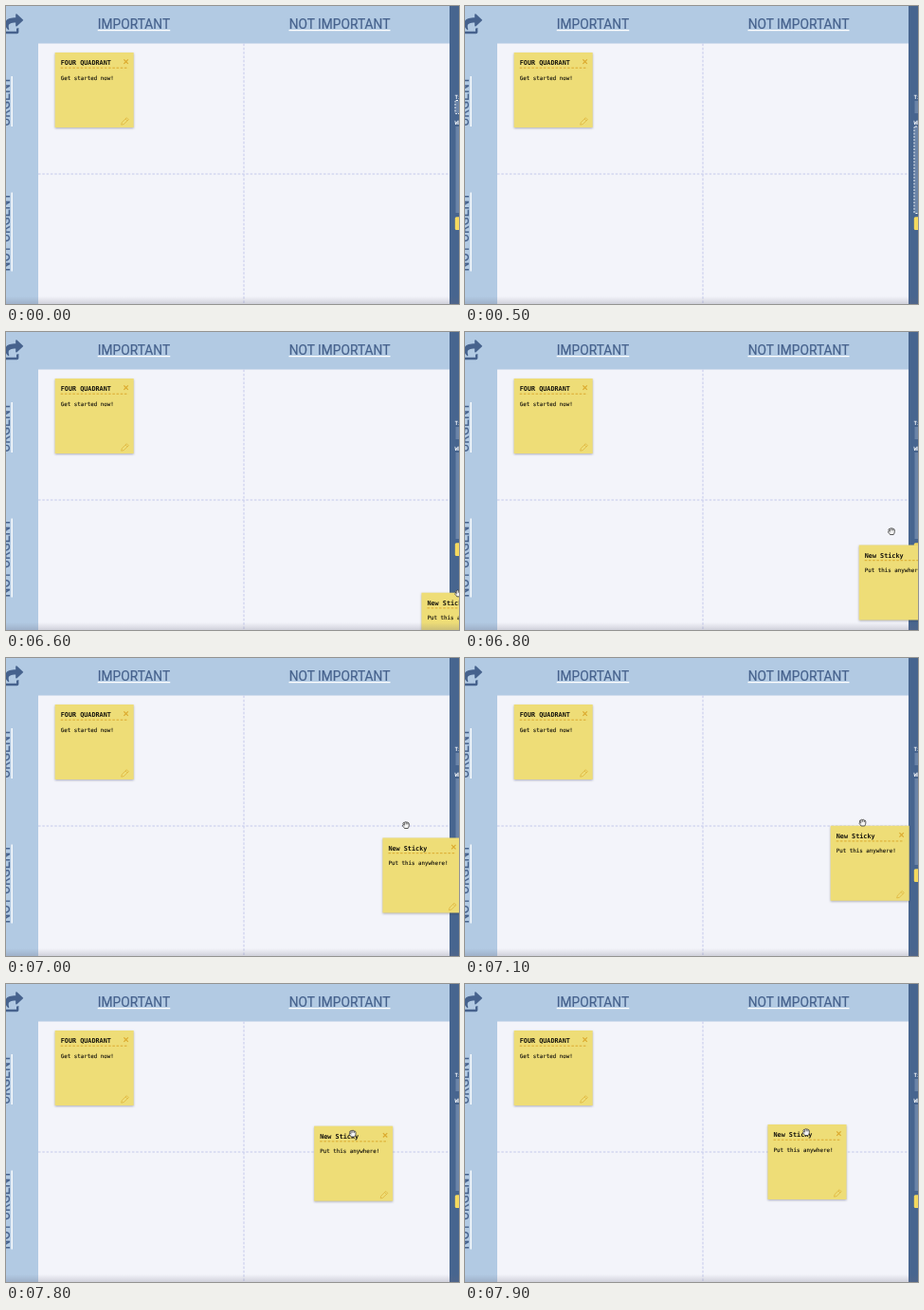
Recreate the animation shown at these times as an HTML page. Size 478x314 px, loop 8 s.

```html
<!DOCTYPE html>
<html lang="en">
<head>
<meta charset="utf-8">
<title>Quadrant board</title>
<style>
  html, body { margin: 0; width: 100%; height: 100%; overflow: hidden; background: #b2cae3; }
  svg { display: block; width: 478px; height: 314px; }
  .head { font: 400 13.75px Roboto, sans-serif; fill: #46628d; stroke: #46628d; stroke-width: .2; text-anchor: middle; }
  .mono { font-family: "DejaVu Sans Mono", monospace; fill: #15130c; }
  .title { font-size: 6.8px; font-weight: 700; }
  .body { font-size: 5.82px; stroke: #15130c; stroke-width: .12; }
  .label { font-size: 5.8px; font-weight: 700; fill: #fff; }
  .note { filter: drop-shadow(0 1px 1.3px rgba(40, 40, 60, .34)); }
  .rule { stroke: #c4c9eb; stroke-dasharray: 2.6 1.7; }
  .focus { fill: none; stroke: #fff; stroke-dasharray: 2 1.3; }
  .field { fill: #6b84a8; }
  .accent { fill: none; stroke: #dba92d; }
</style>
</head>
<body>
<svg viewBox="0 0 478 314" xmlns="http://www.w3.org/2000/svg">
  <defs>
    <linearGradient id="fade" x1="0" y1="0" x2="0" y2="1">
      <stop offset="0" stop-color="#66667c" stop-opacity="0"/>
      <stop offset="1" stop-color="#66667c" stop-opacity=".25"/>
    </linearGradient>
  </defs>

  <rect width="478" height="314" fill="#b2cae3"/>
  <rect x="34" y="39.5" width="434" height="275" fill="#f3f4fa"/>
  <path class="rule" d="M251 39.5V314M34 177H468"/>

  <g id="heads"></g>

  <!-- share icon -->
  <g fill="#46628d">
    <path d="M18 15.2 11.6 21.3Q10.2 22 10.2 20.6V17.5C4 17.6 1.4 19 3.3 24.6Q3.2 25.7 2.2 25.1C.4 23.6-.8 21.4-.8 19.2C-.8 13.2 4 12.3 10.2 12.2V9.2Q10.3 7.8 11.6 8.6L18 14.4Q18.4 14.8 18 15.2Z"/>
    <path d="M-6 26.8H11V23.7L13.4 22.9V27.4Q13.4 29.2 11.6 29.2H-6Z"/>
  </g>

  <!-- side panel -->
  <rect x="468" width="10" height="314" fill="#47658f"/>
  <text class="mono label" x="473.6" y="97.6">Title</text>
  <rect class="field" x="474.5" y="100" width="60" height="13"/>
  <text class="mono label" x="473.6" y="124.6">What</text>
  <rect class="field" x="474.5" y="127" width="60" height="91"/>
  <rect class="focus" id="focusTitle" x="474" y="99.5" width="61" height="14" rx="1"/>
  <rect class="focus" id="focusText" x="474" y="127" width="61" height="91.5" rx="1"/>
  <rect x="473.8" y="222.3" width="40" height="13.7" rx="1.5" fill="#f4d95f"/>

  <g id="notes"></g>

  <rect y="306" width="478" height="8" fill="url(#fade)"/>

  <!-- closed hand -->
  <g id="hand" fill="#f4f4f4" stroke="#333" stroke-width=".8" stroke-linejoin="round">
    <path d="M-3.1-1.6Q-2.9-3-1.6-2.7Q-.9-3.8.2-3Q1.3-3.6 1.9-2.5Q3.2-2.7 3.3-1.2V.7Q3.1 2.2 2.2 3.5H-1.5Q-2.3 2.2-3.3 1.2Q-3.9 0-2.7-.3Z"/>
    <path d="M-1.6-2.5V0M.2-2.9V-.6M1.9-2.4V-.6M-2.7-.3-1.4.9" fill="none" stroke-width=".7"/>
  </g>
</svg>

<script>
const LOOP = 8000, STEP = 100;
const $ = id => document.getElementById(id);

// Heading, with its underline drawn in the same local frame
const heading = (text, width, place) => `
  <g transform="${place}">
    <text class="head">${text}</text>
    <path d="M${-width / 2} 2.1h${width}" stroke="#fff" stroke-width="1.4"/>
  </g>`;

$("heads").innerHTML =
  heading("IMPORTANT", 76.5, "translate(135 23.5)") +
  heading("NOT IMPORTANT", 107, "translate(352 23.5)") +
  heading("URGENT", 53, "translate(4.1 100.5) rotate(-90)") +
  heading("NOT URGENT", 83, "translate(4.1 238) rotate(-90)");

const note = (id, title, body) => `
  <g id="${id}">
    <rect class="note" width="83" height="79" fill="#eedd77"/>
    <text class="mono title" x="6" y="13.1">${title}</text>
    <path class="accent" d="M6 16.2h71.5" stroke-dasharray="2.6 1.6"/>
    <path class="accent" d="m72.7 7.4 4.4 4.4m0-4.4-4.4 4.4" stroke-width="1.2"/>
    <text class="mono body" x="6" y="28.5">${body}</text>
    <path class="accent" d="m70 76.2.6-2.6 5-4.9 2 2-5 4.9zm4.4-6.3 2 2" stroke-width=".6"/>
  </g>`;

$("notes").innerHTML =
  note("first", "FOUR QUADRANT", "Get started now!") +
  note("second", "New Sticky", "Put this anywhere!");

// The drag: at each time, where the note and the hand are
const drag = [
  { at: 6500, note: [449.8, 299.8], hand: [491, 308] },
  { at: 6800, note: [415.7, 224.5], hand: [450, 210] },
  { at: 7000, note: [397.4, 189.5], hand: [422, 176] },
  { at: 7200, note: [374, 164], hand: [417, 171] },
  { at: 7400, note: [374, 164], hand: [415, 170.4] },
  { at: 7900, note: [319.5, 148], hand: [360, 156], ease: k => k * k * (3 - 2 * k) }
];

function place(part, t) {
  const i = Math.max(1, drag.findIndex(p => p.at >= t));
  const from = drag[i - 1], to = drag[i];
  const k = Math.max(0, (t - from.at) / (to.at - from.at));
  const e = to.ease ? to.ease(k) : k;
  return from[part].map((v, axis) => v + (to[part][axis] - v) * e);
}

const move = (id, [x, y]) => $(id).setAttribute("transform", `translate(${x} ${y})`);
const show = (id, on) => $(id).setAttribute("visibility", on ? "visible" : "hidden");

function draw(time) {
  const t = Math.floor(time % LOOP / STEP) * STEP;
  show("focusTitle", t < 500);
  show("focusText", t >= 500 && t < 5300);
  show("second", t >= 5600);
  show("hand", t >= 6600);
  move("second", place("note", t));
  move("hand", place("hand", t));
}

move("first", [51.7, 49]);
draw(0);
const start = performance.now();
function tick() {
  draw(performance.now() - start);
  requestAnimationFrame(tick);
}
requestAnimationFrame(tick);
</script>
</body>
</html>
```
